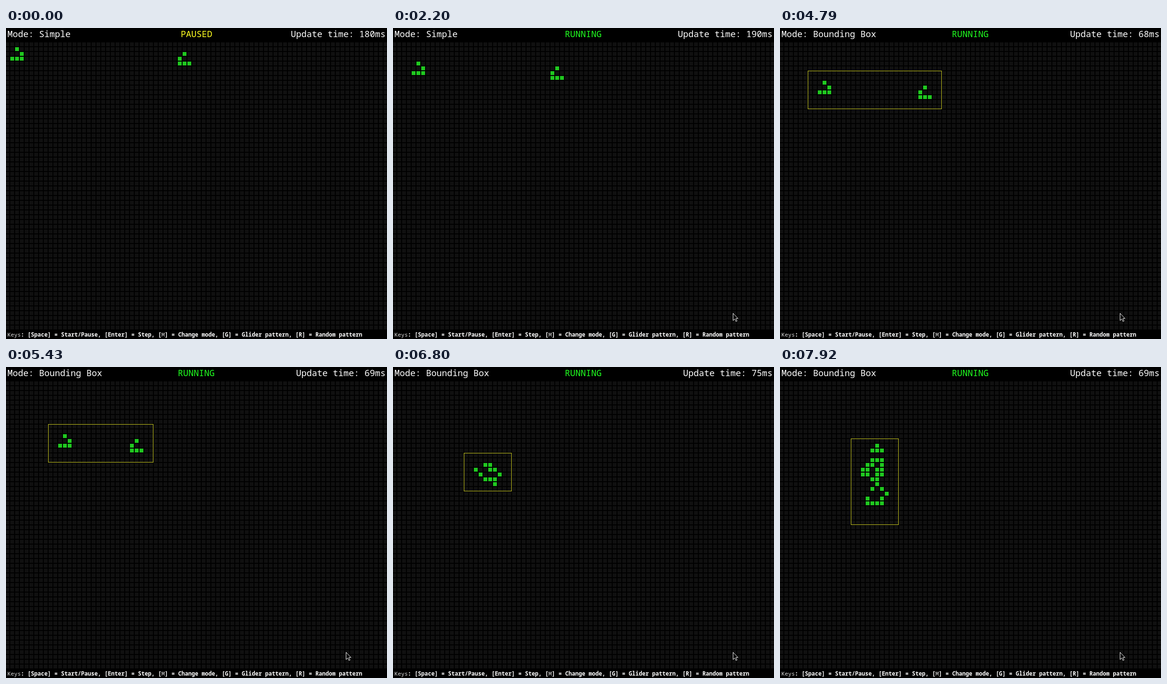
An HTML page with a canvas that plays this animation: 796 px wide and 648 px high, repeating every 7.99 s.

```html
<!DOCTYPE html>
<html lang="en">
<head>
<meta charset="utf-8">
<title>Game of Life</title>
<style>
  html, body { margin: 0; width: 100%; height: 100%; overflow: hidden; background: #000; }
  canvas, svg { position: absolute; left: 0; top: 0; display: block; }
  text { font-family: "Noto Sans Mono", "DejaVu Sans Mono", monospace; fill: #fff; white-space: pre; }
  .head { font-size: 18.333px; }
  .keys { font-size: 11.667px; font-weight: 700; }
  .thin { font-weight: 500; fill: #ddd; }
</style>
</head>
<body>
<canvas id="board" width="796" height="648"></canvas>
<svg width="796" height="648" viewBox="0 0 796 648">
  <text class="head" id="mode" x="3" y="19"></text>
  <text class="head" id="state" y="19"></text>
  <text class="head" id="timing" y="19"></text>
  <text class="keys" x="3" y="643"><tspan class="thin">Keys</tspan>: [Space] = Start/Pause, [Enter] = Step, [<tspan class="thin">M</tspan>] = Change mode, [G] = Glider pattern, [R] = Random pattern</text>
  <path id="cursor" d="M.5 .5V15.5L4 12.3L6.5 17.5L8.8 16.5L6.3 11.3H10.7Z" fill="#000" stroke="#fff"/>
</svg>
<script>
const LOOP = 7990, WIDTH = 796, HEIGHT = 648, COLS = 80, ROWS = 60;
const CHAR = 11; // advance of one heading character

// Each span begins at a time with a generation and adds one every `pace` ms
const SPANS = [
  { start: 442, gen: 0, pace: 143 },
  { start: 3445, gen: 15, pace: 143 },
  { start: 4450, gen: 22, pace: 53.6 },
  { start: 6850, gen: 67, pace: 57.5 }
];
const RUN_AT = SPANS[0].start, BOX_FROM = SPANS[2].gen;

const $ = id => document.getElementById(id);
const ctx = $("board").getContext("2d");
const key = (x, y) => y * COLS + x;
const cellX = x => x * 10 - 1;
const cellY = y => y * 10 + 30;

function step(live) {
  const counts = new Map();
  for (const k of live)
    for (let dy = -1; dy <= 1; dy++)
      for (let dx = -1; dx <= 1; dx++) {
        const n = k + key(dx, dy);
        counts.set(n, (counts.get(n) || 0) + 1);
      }
  return new Set([...counts].filter(([k, c]) => c === 3 || (c === 4 && live.has(k))).map(([k]) => k));
}

function glider(x, y, flip) {
  return [[1, 0], [2, 1], [0, 2], [1, 2], [2, 2]].map(([dx, dy]) => key(x + (flip ? 2 - dx : dx), y + dy));
}

function generationAt(t) {
  const i = Math.max(0, SPANS.findLastIndex(s => t >= s.start));
  const { start, gen, pace } = SPANS[i];
  const limit = i + 1 < SPANS.length ? SPANS[i + 1].gen - 1 : Infinity;
  return Math.min(limit, gen + Math.floor(Math.max(0, t - start) / pace));
}

const history = [new Set([...glider(1, 1, false), ...glider(36, 2, true)])];
while (history.length <= generationAt(LOOP)) history.push(step(history[history.length - 1]));

// Measured durations jitter pseudo-randomly around each mode's usual cost
function updateTime(gen) {
  return gen < BOX_FROM ? 180 + 3 * gen % 13 : 66 + (4 * gen * gen + 10 * gen + 3) % 17;
}

function drawCells(live) {
  ctx.fillStyle = "#000";
  ctx.fillRect(0, 0, WIDTH, HEIGHT);
  for (let y = 0; y < ROWS; y++)
    for (let x = 0; x < COLS; x++) {
      ctx.fillStyle = live.has(key(x, y)) ? "#20c820" : "#101010";
      ctx.fillRect(cellX(x), cellY(y), 8, 8);
    }
}

// The box spans the cells the last update started from, plus two cells around
function drawBox(live) {
  const xs = [...live].map(k => k % COLS), ys = [...live].map(k => Math.floor(k / COLS));
  const left = cellX(Math.min(...xs) - 2) - 0.5, top = cellY(Math.min(...ys) - 2) - 0.5;
  const right = cellX(Math.max(...xs) + 2) + 8.5, bottom = cellY(Math.max(...ys) + 2) + 8.5;
  ctx.strokeStyle = "#c8c820";
  ctx.lineWidth = 1;
  ctx.strokeRect(left, top, right - left, bottom - top);
}

function moveCursor(t) {
  const rest = Math.pow(1 - Math.min(1, Math.max(0, (t - 60) / 300)), 2);
  $("cursor").setAttribute("transform", `translate(${Math.round(710 + 24 * rest)} ${Math.round(594 + 30 * rest)})`);
  $("cursor").setAttribute("visibility", t < 60 ? "hidden" : "visible");
}

// Places text on whole pixels: align 0.5 centres it on x, 1 ends it there
function setText(id, text, x, align, color) {
  const node = $(id);
  node.textContent = text;
  node.setAttribute("x", Math.floor(x - text.length * CHAR * align));
  node.style.fill = color;
}

function render(t) {
  const gen = generationAt(t), boxed = gen >= BOX_FROM, running = t >= RUN_AT;
  drawCells(history[gen]);
  if (boxed) drawBox(history[gen - 1]);
  setText("mode", "Mode: " + (boxed ? "Bounding Box" : "Simple"), 3, 0, "#fff");
  setText("state", running ? "RUNNING" : "PAUSED", WIDTH / 2, 0.5, running ? "#20ff20" : "#ffff20");
  setText("timing", `Update time: ${updateTime(gen)}ms`, WIDTH - 3, 1, "#fff");
  moveCursor(t);
}

const start = performance.now();
function frame() {
  render((performance.now() - start) % LOOP);
  requestAnimationFrame(frame);
}
frame();
</script>
</body>
</html>
```
